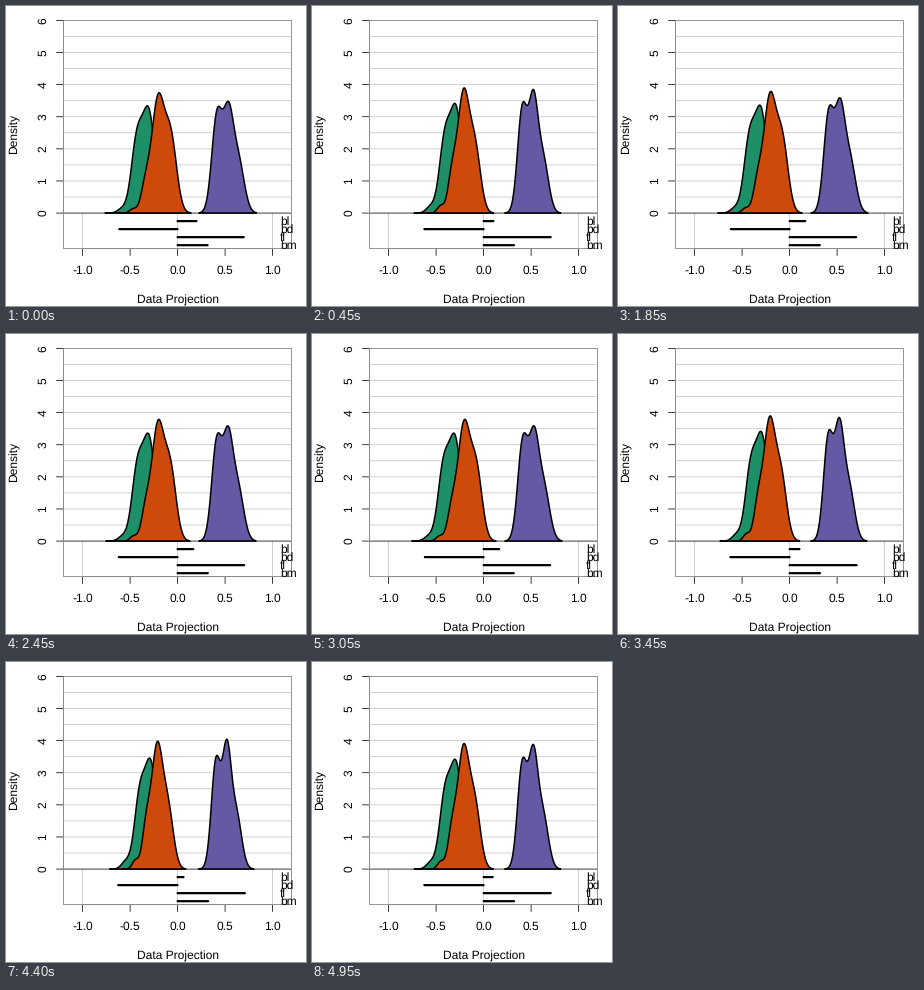
Animation, 300 px wide and 300 px high, one loop 5 s. Source, as a matplotlib script:

```python
import math

import numpy as np
import matplotlib.pyplot as plt
from matplotlib.animation import FuncAnimation
from matplotlib.patches import Rectangle

plt.rcParams["font.family"] = "Liberation Sans"
plt.rcParams["font.size"] = 12
plt.rcParams["path.snap"] = False
plt.rcParams["text.hinting"] = "no_hinting"

SIZE, DPI = 300, 72
FRAMES, INTERVAL = 100, 50
LEFT, RIGHT, TOP, BOTTOM = 57.6, 285.6, 14.4, 242.4
THIN = 0.75

# The "bl" weight swings between START and zero at a fixed angular step.
START, STEP, HALF = 0.2, 0.0345, 6
REST = {"bd": -0.627, "fl": 0.71, "bm": 0.322}
NAMES = ["bl", *REST]


class Group:
    """A density curve: a sum of bumps (centre, width, height, end height).

    As the "bl" weight fades, centres close in on the pivot by `pull`
    and widths shrink by `thin`.
    """

    def __init__(self, color, pivot, pull, thin, start, end, bumps):
        self.color, self.pivot, self.pull, self.thin = color, pivot, pull, thin
        self.start, self.end, self.bumps = start, end, bumps

    def outline(self, u):
        near = 1 - self.pull * u
        lo, hi = (self.pivot + (v - self.pivot) * near
                  for v in (self.start, self.end))
        x = np.linspace(lo, hi, 220)
        y = np.zeros_like(x)
        for c, w, h0, h1 in self.bumps:
            c = self.pivot + (c - self.pivot) * near
            w *= 1 - self.thin * u
            y += (h0 + (h1 - h0) * u) * np.exp(-((x - c) / w) ** 2 / 2)
        y[[0, -1]] = 0
        return np.column_stack([x, py(0) - y])


GROUPS = [
    Group("#1e9068", 180, 0.09, 0.07, 99, 176,
          [(131, 5.7, 72, 72), (143, 6, 97, 102), (116, 4.5, 4, 9)]),
    Group("#cd4a0a", 145, 0.2, 0.15, 112, 185,
          [(152, 6.3, 112, 125), (164.9, 5.9, 72, 45), (139.5, 4.5, 26, 46),
           (127, 3.5, 4, 11)]),
    Group("#6359a4", 183, 0.06, 0.18, 193, 250.5,
          [(211, 5.2, 96, 111), (222.3, 5.1, 92, 128), (232.5, 5.8, 50, 53)]),
]


def px(x):
    return LEFT + (x + 1.2) / 2.4 * (RIGHT - LEFT)


def py(y):
    return BOTTOM - (y + 1.1) / 7.1 * (BOTTOM - TOP)


def angle(frame):
    p = frame % (2 * HALF)
    if p <= HALF:
        return max(0, START - p * STEP)
    return min(START, (p - HALF) * STEP)


def weights(t):
    return [math.sin(t)] + [math.cos(t) * v for v in REST.values()]


fig = plt.figure(figsize=(SIZE / DPI, SIZE / DPI), dpi=DPI, facecolor="white")
ax = fig.add_axes([0, 0, 1, 1])
ax.set_xlim(0, SIZE)
ax.set_ylim(SIZE, 0)
ax.axis("off")


def line(x, y, color="black", lw=THIN, z=1):
    return ax.plot(x, y, color=color, lw=lw, zorder=z,
                   solid_capstyle="round")[0]


def label(x, y, text, turn=0, ha="center"):
    return ax.text(x, y, text, ha=ha, va="baseline", rotation=turn,
                   rotation_mode="anchor", zorder=6)


def frame_box(**style):
    return Rectangle((LEFT, TOP), RIGHT - LEFT, BOTTOM - TOP, **style)


# Axes
line([px(-1), px(1)], [BOTTOM] * 2)
for v in np.arange(-1, 1.1, 0.5):
    line([px(v)] * 2, [BOTTOM, BOTTOM + 7.2])
    label(px(v), 268.3, f"{v:.1f}")
line([LEFT] * 2, [py(0), py(6)])
for v in range(7):
    line([LEFT - 7.2, LEFT], [py(v)] * 2)
    label(40.3, py(v), str(v), 90)
label((LEFT + RIGHT) / 2, 297.1, "Data Projection")
label(11.5, (TOP + BOTTOM) / 2, "Density", 90)

# Grid, and a grey box laid over a black one
for v in np.arange(0.5, 6, 0.5):
    line([LEFT, RIGHT], [py(v)] * 2, "#c4c4c4")
for v in (-1, 0, 1):
    line([px(v)] * 2, [py(-1.1), py(0)], "#c4c4c4")
for color, z in (("black", 0), ("#b3b3b3", 5)):
    ax.add_patch(frame_box(fill=False, edgecolor=color, lw=THIN, zorder=z))

shapes = [ax.add_patch(plt.Polygon([(0, 0)], facecolor=g.color,
                                   edgecolor="black", lw=1.5,
                                   joinstyle="round", zorder=3))
          for g in GROUPS]
line([LEFT, RIGHT], [py(0)] * 2, z=4)

# Weight bars with labels cut off at the plot edge
clip = frame_box(transform=ax.transData)
bars = []
for i, name in enumerate(NAMES, 1):
    y = py(-i / len(NAMES))
    bars.append(line([px(0)] * 2, [y, y], lw=2.25, z=6))
    label(px(1) + 7.2, y + 4, name, ha="left").set_clip_path(clip)


def draw(frame):
    t = angle(frame)
    u = (1 - t / START) ** 1.2
    for shape, group in zip(shapes, GROUPS):
        shape.set_xy(group.outline(u))
    for bar, w in zip(bars, weights(t)):
        bar.set_xdata([px(0), px(w)])
    return shapes + bars


anim = FuncAnimation(fig, draw, frames=FRAMES, interval=INTERVAL,
                     repeat=True, repeat_delay=0)
plt.show()
```
